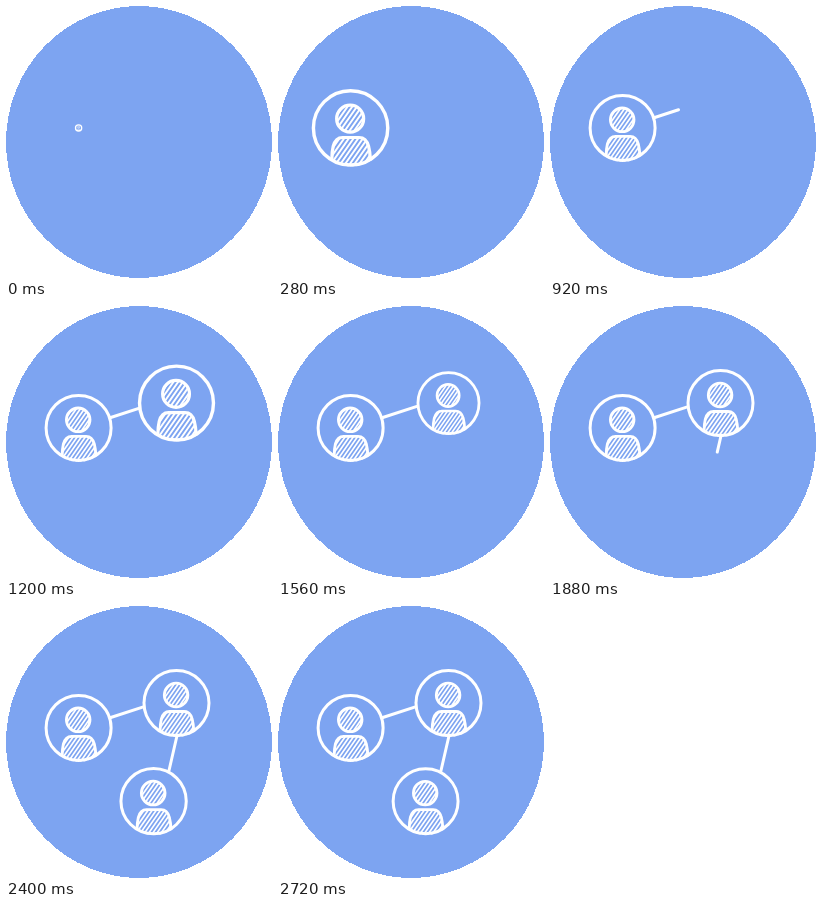
Recreate the animation shown at these times as an HTML page. Size 266 by 272 pixels, loop 2880 ms.

```html
<!DOCTYPE html>
<html lang="en">
<head>
<meta charset="utf-8">
<title>Connected people</title>
<style>
html, body { margin: 0; width: 100%; height: 100%; overflow: hidden; background: #fff; }
svg { display: block; width: 100vw; height: 100vh; }
.ink { fill: none; stroke: #fff; stroke-linecap: round; stroke-linejoin: round; }
.ring { fill: #7da4f1; stroke: #fff; stroke-width: var(--ring); }
</style>
</head>
<body>
<svg viewBox="0 0 266 272">
  <defs>
    <clipPath id="headClip"><circle cx="-.4" cy="-8.1" r="11.6"/></clipPath>
    <clipPath id="bodyClip"><path d="M-16.5 29V20Q-16 8.6-7 8.6H7.5Q16.5 8.6 17.2 20V29A32 32 0 0 1-16.5 29Z"/></clipPath>
    <g id="person">
      <circle class="ring" r="32.5"/>
      <g class="ink" stroke-width="1.7">
        <path class="hatch" clip-path="url(#headClip)"/>
        <path class="hatch" clip-path="url(#bodyClip)"/>
      </g>
      <g class="ink" stroke-width="2.8">
        <circle cx="-.4" cy="-8.1" r="11.8"/>
        <path d="M-16.4 27.5Q-16.4 21-15.2 16Q-13.2 8.4-7 8.4H7.5Q13.7 8.4 15.7 16Q17 21 17.3 27.5"/>
      </g>
    </g>
  </defs>
  <ellipse cx="133" cy="136" rx="133" ry="136" fill="#7da4f1" shape-rendering="crispEdges"/>
  <g id="links" class="ink" stroke-width="3"></g>
  <g id="people"></g>
</svg>
<script>
const LOOP = 2880, STEP = 40, SEG = 240, DRAW = 310;
const PEAK = 1.17, DIP = 0.92;

// centre and start time of each person
const people = [
  { x: 72.6, y: 121.9, at: -10 },
  { x: 170.5, y: 97.1, at: 1000 },
  { x: 147.6, y: 195.2, at: 2015 }
];
// end points and start time of each connecting line
const links = [
  { from: [104, 111.8], to: [142, 99.4], at: 720 },
  { from: [171.4, 128], to: [162.2, 168], at: 1740 }
];

const add = (tag, parent) =>
  document.getElementById(parent).appendChild(document.createElementNS('http://www.w3.org/2000/svg', tag));

let hatch = '';
for (let x = -52; x < 52; x += 4.1) hatch += `M${x - 16} 34L${x + 23} -22`;
document.querySelectorAll('.hatch').forEach(p => p.setAttribute('d', hatch));

for (const p of people) {
  p.el = add('use', 'people');
  p.el.setAttribute('href', '#person');
}
for (const l of links) l.el = add('path', 'links');

const outQuad = k => k * (2 - k);
const inOut = k => (1 - Math.cos(Math.PI * k)) / 2;

// grow past full size, dip below it, settle
function pop(t) {
  if (t <= 0) return 0;
  if (t < SEG) return PEAK * outQuad(t / SEG);
  if (t < 2 * SEG) return PEAK + (DIP - PEAK) * inOut(t / SEG - 1);
  if (t < 3 * SEG) return DIP + (1 - DIP) * inOut(t / SEG - 2);
  return 1;
}

function render(time) {
  const t = Math.floor((time % LOOP) / STEP) * STEP;
  for (const { el, x, y, at } of people) {
    const s = pop(t - at);
    el.style.display = s ? '' : 'none';
    el.style.setProperty('--ring', Math.max(3, 1.3 / (s || 1))); // never thinner than a hairline
    el.setAttribute('transform', `translate(${x} ${y}) scale(${s})`);
  }
  for (const { el, from: [x, y], to, at } of links) {
    const k = Math.min(1, Math.max(0, (t - at) / DRAW));
    el.setAttribute('d', k ? `M${x} ${y}L${x + (to[0] - x) * k} ${y + (to[1] - y) * k}` : '');
  }
}

const start = performance.now();
function tick() {
  render(performance.now() - start);
  requestAnimationFrame(tick);
}
tick();
</script>
</body>
</html>
```
